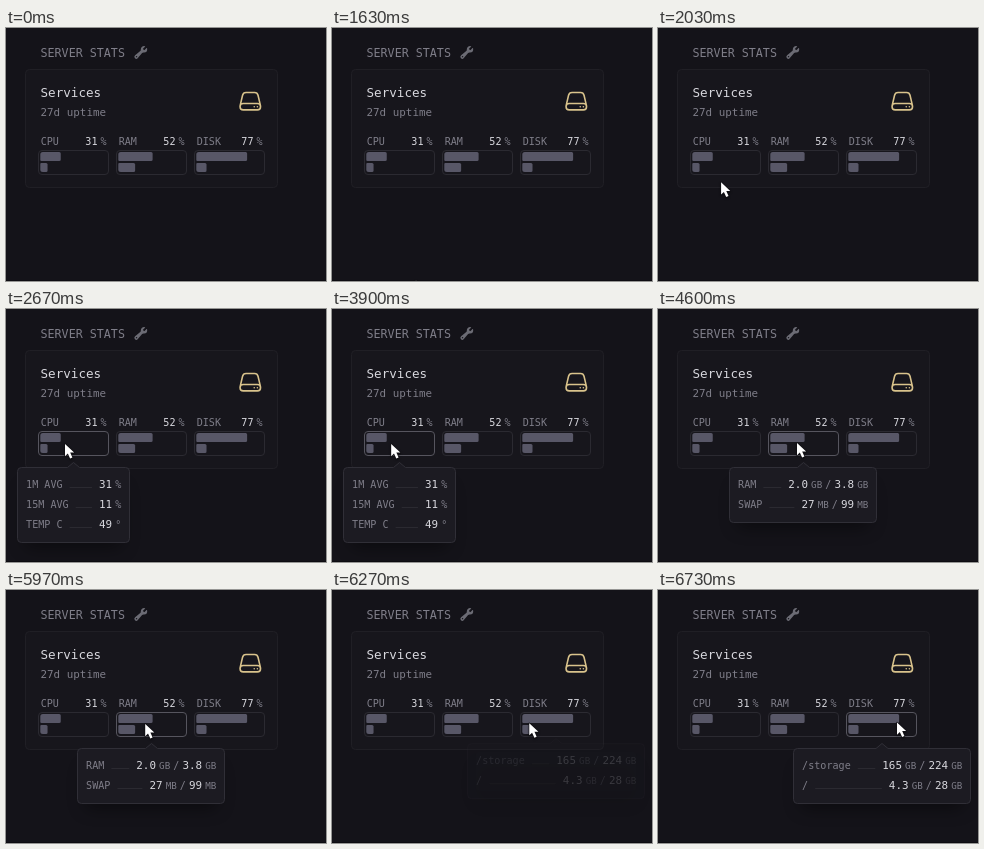
Recreate the animation shown at these times as an HTML page with a canvas. Size 320 by 253 pixels, loop 8 s.

```html
<!DOCTYPE html>
<html lang="en">
<head>
<meta charset="utf-8">
<title>Server stats</title>
<style>
  html, body { margin: 0; width: 100%; height: 100%; overflow: hidden; background: #141319; }
  canvas { display: block; width: 320px; height: 253px; }
</style>
</head>
<body>
<canvas id="stage"></canvas>
<script>
const WIDTH = 320, HEIGHT = 253, LOOP = 8000;
const FONT = '"DejaVu Sans Mono", "Noto Sans Mono", monospace';
const COLOR = {
  page: '#141319', panel: '#17161c', panelEdge: '#201f25',
  popover: '#1c1b22', popoverEdge: '#302f37', leader: '#2b2a31',
  text: '#d8d8de', muted: '#7f7e89', bar: '#585767', accent: '#d9c38c'
};
const SIZE = { unit: 9.2, small: 10.1, base: 10.9, title: 11.7, large: 12.6 };
const DIGIT_RATIO = 0.602;

const meters = [
  { label: 'CPU', value: 31, second: 11, x: 32.5 },
  { label: 'RAM', value: 52, second: 25.5, x: 110.5 },
  { label: 'DISK', value: 77, second: 15.5, x: 188.5 }
];

// Row parts are listed from left to right; units and slashes are drawn muted.
const popovers = [
  { start: 2350, end: 4275, left: 11.5, right: 123.5, arrow: 67.5, rows: [
    ['1M AVG', '31', '%'], ['15M AVG', '11', '%'], ['TEMP C', '49', '°']] },
  { start: 4275, end: 6262, left: 71.5, right: 218.5, arrow: 145.5, rows: [
    ['RAM', '2.0', 'GB', '/', '3.8', 'GB'], ['SWAP', '27', 'MB', '/', '99', 'MB']] },
  { start: 6262, end: LOOP, left: 135.5, right: 312.5, arrow: 224, rows: [
    ['/storage', '165', 'GB', '/', '224', 'GB'], ['/', '4.3', 'GB', '/', '28', 'GB']] }
];

const sineOut = u => Math.sin(u * Math.PI / 2);
const powerOut = u => 1 - (1 - u) ** 2.6;
const expoOut = u => u >= 1 ? 1 : 1 - 2 ** (-10 * u);
const moves = [
  { start: 1630, end: 2430, from: [84, 253], to: [59, 135], ease: powerOut },
  { start: 3900, end: 4600, from: [59, 135], to: [139, 134], ease: sineOut },
  { start: 5970, end: 6730, from: [139, 134], to: [239, 132.5], ease: sineOut }
];

const wrench = new Path2D('M19 5.5a4.5 4.5 0 0 1-4.791 4.49c-.873-.055-1.808.128-2.368.8l-6.024 7.23a2.724 2.724 0 1 1-3.837-3.837L9.21 8.16c.672-.56.855-1.495.8-2.368a4.5 4.5 0 0 1 5.873-4.575c.324.105.39.51.15.752L13.34 4.66a.455.455 0 0 0-.11.494 3.01 3.01 0 0 0 1.617 1.617c.17.07.363.02.493-.111l2.692-2.692c.241-.241.647-.174.752.15.14.435.216.9.216 1.382ZM4 17a1 1 0 1 0 0-2 1 1 0 0 0 0 2Z');
const drive = new Path2D('M21.75 17.25v-.228a4.5 4.5 0 0 0-.12-1.03l-2.268-9.64a3.375 3.375 0 0 0-3.285-2.602H7.923a3.375 3.375 0 0 0-3.285 2.602l-2.268 9.64a4.5 4.5 0 0 0-.12 1.03v.228m19.5 0a3 3 0 0 1-3 3H5.25a3 3 0 0 1-3-3m19.5 0a3 3 0 0 0-3-3H5.25a3 3 0 0 0-3 3m16.5 0h.008v.008h-.008v-.008Zm-3 0h.008v.008h-.008v-.008Z');
const pointer = new Path2D('M0 0V13.8L3.2 10.9L5.8 16.6L8.4 15.4L5.9 9.8H10.4Z');

const canvas = document.getElementById('stage');
const ctx = canvas.getContext('2d');
const ratio = window.devicePixelRatio || 1;
canvas.width = Math.round(WIDTH * ratio);
canvas.height = Math.round(HEIGHT * ratio);
ctx.scale(ratio, ratio);

const clamp = u => Math.min(1, Math.max(0, u));
const lerp = (a, b, u) => a + (b - a) * u;

function text(string, x, baseline, size, color, align = 'left') {
  ctx.font = `${size}px ${FONT}`;
  ctx.fillStyle = color;
  ctx.textAlign = align;
  ctx.fillText(string, x, baseline);
}

function box(x, y, w, h, radius, fill, stroke) {
  ctx.beginPath();
  ctx.roundRect(x, y, w, h, radius);
  if (fill) { ctx.fillStyle = fill; ctx.fill(); }
  if (stroke) { ctx.strokeStyle = stroke; ctx.lineWidth = 1; ctx.stroke(); }
}

function at(x, y, scale, paint) {
  ctx.save();
  ctx.translate(x, y);
  ctx.scale(scale, scale);
  paint();
  ctx.restore();
}

function castShadow(color, blur, offsetY) {
  ctx.shadowColor = color;
  ctx.shadowBlur = blur * ratio;
  ctx.shadowOffsetY = offsetY * ratio;
}

// Lays parts out leftwards from the right edge and returns where they begin.
function valuesRight(parts, right, baseline, valueSize) {
  let x = right;
  for (const part of [...parts].reverse()) {
    const isValue = /\d/.test(part);
    const size = isValue ? valueSize : part.length > 1 ? SIZE.unit : SIZE.small;
    text(part, x, baseline, size, isValue ? COLOR.text : COLOR.muted, 'right');
    x -= part.length * size * DIGIT_RATIO + 3.1;
  }
  return x + 3.1;
}

function drawMeter({ label, value, second, x }, glow) {
  text(label, x + 2.2, 117, SIZE.small, COLOR.muted);
  valuesRight([String(value), '%'], x + 68.2, 117, SIZE.small);
  const edge = [lerp(43, 86, glow), lerp(42, 85, glow), lerp(49, 94, glow)];
  box(x, 122.5, 70, 24, 3.5, null, `rgb(${edge})`);
  box(x + 1.8, 124, value * 0.66, 9, [2.5, 1.5, 1.5, 1], COLOR.bar);
  box(x + 1.8, 135, second * 0.66, 9, [1, 1.5, 1.5, 2.5], COLOR.bar);
}

function drawPopover({ start, left, right, arrow, rows }, time) {
  const shown = expoOut(clamp((time - start) / 300));
  const top = 158.5, bottom = top + 15 + rows.length * 20;
  ctx.save();
  ctx.globalAlpha = shown;
  ctx.translate(0, -6 * (1 - shown));

  ctx.save();
  castShadow('rgba(0, 0, 0, .45)', 17, 12.5);
  box(left + 8, top + 8, right - left - 16, bottom - top - 16, 4, COLOR.popover);
  ctx.restore();

  const corner = 4;
  ctx.beginPath();
  ctx.moveTo(left + corner, top);
  ctx.lineTo(arrow - 6, top);
  ctx.lineTo(arrow, top - 5);
  ctx.lineTo(arrow + 6, top);
  ctx.arcTo(right, top, right, bottom, corner);
  ctx.arcTo(right, bottom, left, bottom, corner);
  ctx.arcTo(left, bottom, left, top, corner);
  ctx.arcTo(left, top, right, top, corner);
  ctx.closePath();
  ctx.fillStyle = COLOR.popover;
  ctx.fill();
  ctx.strokeStyle = COLOR.popoverEdge;
  ctx.lineWidth = 1;
  ctx.stroke();

  rows.forEach(([label, ...parts], i) => {
    const baseline = 179 + i * 19.8;
    text(label, left + 8.6, baseline, SIZE.small, COLOR.muted);
    const valueStart = valuesRight(parts, right - 8.2, baseline, SIZE.base);
    const lineStart = left + 8.6 + label.length * SIZE.small * DIGIT_RATIO + 7;
    ctx.fillStyle = COLOR.leader;
    ctx.fillRect(lineStart, Math.round(baseline) - 1, valueStart - 7 - lineStart, 1);
  });
  ctx.restore();
}

function drawPointer(time) {
  const move = moves.filter(m => time >= m.start).pop();
  if (!move) return;
  const u = move.ease(clamp((time - move.start) / (move.end - move.start)));
  const [x, y] = move.from.map((from, i) => lerp(from, move.to[i], u));
  at(x, y, 0.88, () => {
    castShadow('rgba(0, 0, 0, .5)', 2, 1);
    ctx.strokeStyle = '#111015';
    ctx.lineWidth = 1.4;
    ctx.lineJoin = 'round';
    ctx.stroke(pointer);
    ctx.shadowColor = 'transparent';
    ctx.fillStyle = '#fff';
    ctx.fill(pointer);
  });
}

function draw(time) {
  ctx.fillStyle = COLOR.page;
  ctx.fillRect(0, 0, WIDTH, HEIGHT);
  ctx.fillStyle = '#0d0c11';
  ctx.fillRect(0, 252, WIDTH, 1);

  text('SERVER STATS', 34.5, 28.5, SIZE.title, COLOR.muted);
  at(127.7, 17.3, 0.71, () => {
    ctx.fillStyle = '#6b6b74';
    ctx.fill(wrench, 'evenodd');
  });

  box(19.5, 41.5, 252, 118, 4, COLOR.panel, COLOR.panelEdge);
  text('Services', 34.5, 69, SIZE.large, COLOR.text);
  text('27d uptime', 34.5, 87.5, SIZE.base, COLOR.muted);
  at(231.7, 60.6, 1.05, () => {
    ctx.strokeStyle = COLOR.accent;
    ctx.lineWidth = 1.5;
    ctx.lineCap = ctx.lineJoin = 'round';
    ctx.stroke(drive);
  });

  const active = popovers.findIndex(p => time >= p.start && time < p.end);
  meters.forEach((meter, i) => {
    drawMeter(meter, i === active ? clamp((time - popovers[i].start) / 300) : 0);
  });
  if (active >= 0) drawPopover(popovers[active], time);
  drawPointer(time);
}

const began = performance.now();
function tick() {
  draw((performance.now() - began) % LOOP);
  requestAnimationFrame(tick);
}
tick();
</script>
</body>
</html>
```
